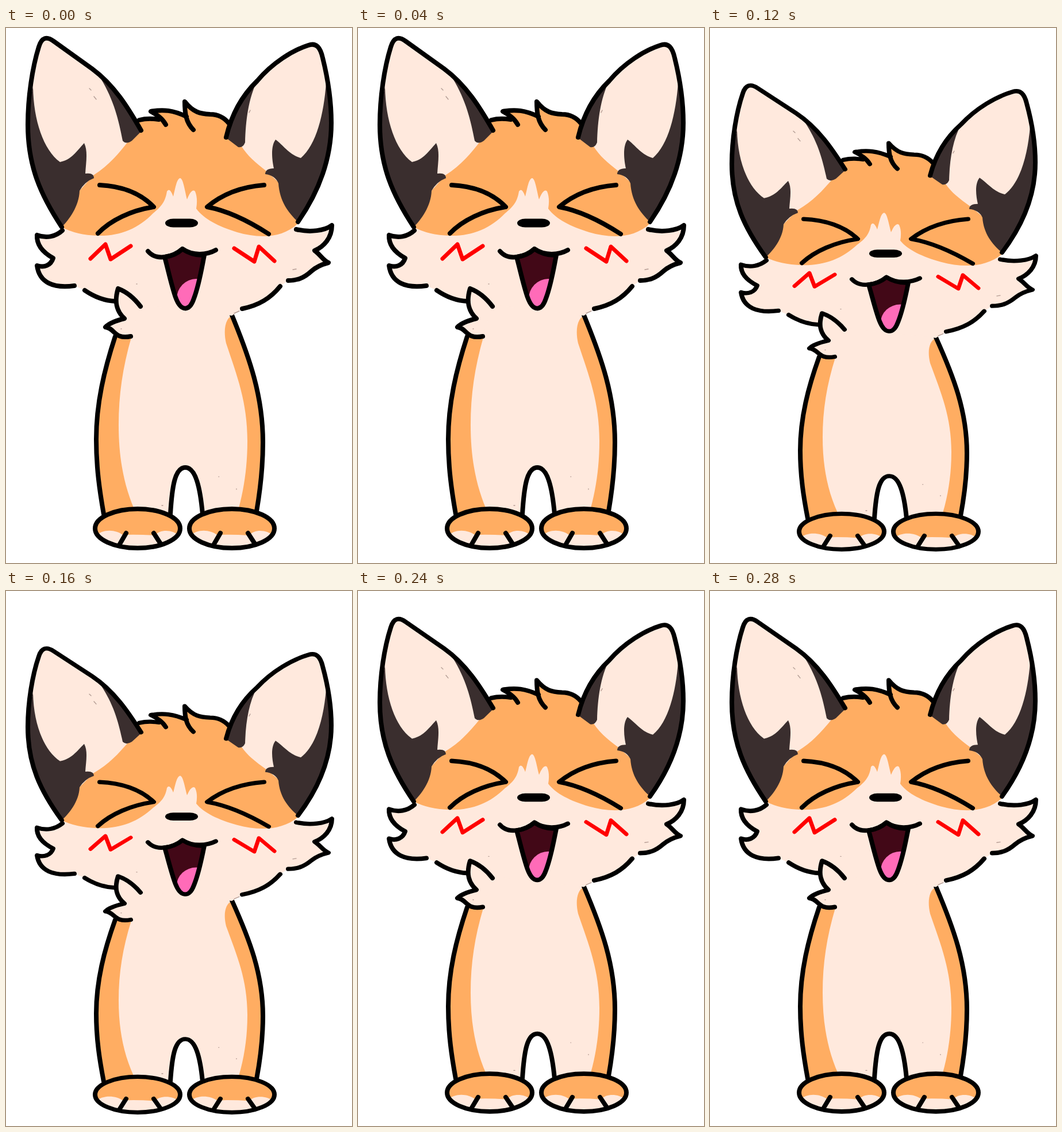
Recreate the animation shown at these times as an HTML page. Size 602 by 930 pixels, loop 0.3 s.

```html
<!DOCTYPE html>
<html lang="en">
<head>
<meta charset="utf-8">
<title>Bouncing fox</title>
<style>
  html, body { margin: 0; width: 100%; height: 100%; overflow: hidden; background: #fff; }
  svg { display: block; width: 100vw; height: 100vh; }
  .cream { fill: #ffe9dd; }
  .orange { fill: #ffad62; }
  .dark { fill: #3a2e2e; }
  .line { fill: none; stroke: #000; stroke-width: 8; stroke-linecap: round; stroke-linejoin: round; }
  .blush { fill: none; stroke: #f00; stroke-width: 7; stroke-linecap: round; stroke-linejoin: round; }
  .speck { fill: none; stroke: #b49c94; stroke-width: 1.4; stroke-linecap: round; }
</style>
</head>
<body>
<svg viewBox="0 0 602 930">
  <defs>
    <path id="earL" d="M97 346 C60 290 38 240 38 168 C38 120 46 68 57 33 C62 16 71 14 83 23 L150 71 C188 99 212 138 235 178"/>
    <path id="earR" d="M383 190 C392 152 408 120 437 92 C463 61 498 39 526 30 C540 25 547 34 551 52 C561 92 566 125 566 165 C566 232 542 288 508 337"/>
    <path id="cheekL" d="M98 352 C86 363 70 366 54 360 C53 377 64 390 82 400 C78 413 66 417 54 413 C58 443 83 453 119 448"/>
    <path id="cheekR" d="M505 350 C530 356 555 352 567 343 C567 365 553 380 537 387 C545 392 552 404 561 408 C549 411 540 415 531 423 C518 435 506 439 491 439"/>
    <path id="mouth" d="M276 398 C282 420 288 448 295 468 C304 493 319 494 327 470 C336 446 340 420 345 395 Q324 396 307 384 Q294 396 276 398 Z"/>
    <clipPath id="mouthClip"><use href="#mouth"/></clipPath>
    <clipPath id="footClip"><ellipse cx="229" cy="870" rx="74" ry="34"/></clipPath>
    <g id="foot">
      <ellipse class="orange" cx="229" cy="870" rx="74" ry="34"/>
      <path class="cream" clip-path="url(#footClip)" d="M150 890 C163 869 190 871 203 881 Q230 880 259 882 C268 871 290 872 300 882 L300 910 H150 Z"/>
      <ellipse class="line" cx="229" cy="870" rx="74" ry="34"/>
      <path class="line" d="M209 878 L198 897 M257 878 L268 895"/>
    </g>
  </defs>
  <g id="fox">
    <!-- body -->
    <path class="cream" d="M190 536 L206 505 L195 453 L393 485 V499 C424 574 447 640 447 720 C447 765 442 805 436 845 H342 C338 800 330 764 312 764 C294 764 289 796 286 845 H170 C163 805 157 765 157 715 C157 652 171 594 190 536 Z"/>
    <path class="orange" d="M190 536 L218 538 C203 590 196 638 196 690 C196 750 206 800 227 845 H170 C163 805 157 765 157 715 C157 652 171 594 190 536 Z"/>
    <path class="orange" d="M393 500 C424 574 447 640 447 720 C447 765 442 805 436 845 H402 C414 805 420 762 420 718 C420 650 402 605 383 548 C378 526 381 506 393 500 Z"/>
    <path class="line" d="M190 536 C171 594 157 652 157 715 C157 765 163 805 170 845 M393 499 C424 574 447 640 447 720 C447 765 442 805 436 840 M286 845 C289 796 294 764 312 764 C330 764 338 800 342 845"/>
    <use href="#foot"/>
    <use href="#foot" x="164"/>

    <!-- head fills -->
    <use href="#earL" class="cream"/>
    <use href="#earR" class="cream"/>
    <use href="#cheekL" class="cream"/>
    <use href="#cheekR" class="cream"/>
    <path class="cream" d="M98 346 L300 230 L506 346 L537 387 L491 439 L477 449 C460 470 440 482 411 488 L393 500 L190 476 C170 474 153 467 137 456 L119 448 L82 400 Z"/>
    <path class="orange" d="M97 346 L126 285 L152 256 C180 238 196 218 212 198 L236 178 L230 160 Q245 156 266 160 L252 145 C274 141 291 143 314 154 Q313 140 311 128 C326 147 338 149 355 150 C370 150 380 156 388 166 L383 190 L410 206 C420 222 434 234 452 248 L474 268 L508 340 C480 366 440 366 402 355 C370 345 344 332 331 314 Q334 296 329 284 Q323 278 315 298 C310 277 308 262 303 261 C297 262 295 277 291 293 Q285 276 280 284 C277 304 268 312 256 322 C230 349 198 362 160 361 Q122 360 97 346 Z"/>

    <!-- ear markings -->
    <path class="dark" d="M47 103 C48 160 65 212 94 233 C114 229 123 214 136 200 C143 214 139 235 138 253 Q153 251 153 261 Q137 267 128 283 C127 310 110 333 97 346 C60 290 38 240 38 168 Q38 138 47 103 Z"/>
    <path class="dark" d="M165 88 C188 126 196 160 203 196 Q209 203 219 196 L236 179 C214 140 192 110 165 84 Z"/>
    <path class="dark" d="M557 95 C553 150 540 203 513 226 C492 220 483 204 469 194 C460 206 463 230 466 244 Q451 244 451 254 Q468 256 474 270 C476 300 490 320 508 337 C542 288 566 232 566 165 Q566 128 557 95 Z"/>
    <path class="dark" d="M437 92 C422 122 417 160 416 199 Q412 209 404 207 L383 191 C392 152 408 120 437 92 Z"/>

    <!-- head lines -->
    <use href="#earL" class="line"/>
    <use href="#earR" class="line"/>
    <use href="#cheekL" class="line"/>
    <use href="#cheekR" class="line"/>
    <path class="line" d="M137 456 C153 467 170 474 190 475 M477 449 C460 470 440 482 411 488"/>
    <path class="line" d="M232 160 Q247 156 266 159 M278 168 C272 157 263 151 252 145 C274 141 291 143 314 154 M326 177 C313 164 311 148 311 128 C326 147 338 149 355 150 C370 150 380 156 388 166"/>
    <path class="cream" d="M234 484 C222 468 208 458 195 453 C188 476 192 492 206 505 C194 508 180 512 173 520 C190 522 188 542 217 536 Z"/>
    <path class="line" d="M234 484 C222 468 208 458 195 453 C188 476 192 492 206 505 C194 508 180 512 173 520 C190 522 188 542 217 536"/>

    <!-- face -->
    <path class="line" d="M163 273 C204 275 236 289 257 311 C218 317 182 334 160 357 M449 273 C410 276 376 289 350 311 C388 318 426 338 457 358"/>
    <rect x="277" y="331.5" width="57" height="15" rx="14" ry="7.5"/>
    <use href="#mouth" fill="#420817"/>
    <ellipse cx="331" cy="471" rx="34" ry="35" fill="#ff6bb8" clip-path="url(#mouthClip)"/>
    <use href="#mouth" class="line"/>
    <path class="line" d="M247 388 C262 406 291 398 307 384 C324 396 349 395 365 386"/>
    <path class="blush" d="M147 401 L173 376 L182 402 L217 379 M397 383 L432 406 L440 380 L467 405"/>
    <path class="speck" d="M145 105 l3 3 M153 119 l4 5 M423 147 l2 -4 M499 420 l6 -1 M200 523 h1 M227 445 h1 M271 830 h2 M401 801 v1 M370 780 h.5 M397 496 l9 -4"/>
  </g>
</svg>
<script>
  const fox = document.getElementById("fox");
  const hold = 60;
  const floor = 930;
  // share of the height lost at each step of the bounce
  const squash = [0, 0.0328, 0.09, 0.0537, 0.0339];

  function draw(ms) {
    const step = Math.floor(ms / hold) % squash.length;
    const k = 1 - squash[step];
    fox.setAttribute("transform", `translate(0 ${floor * (1 - k)}) scale(1 ${k})`);
  }

  let start;
  function tick(now) {
    start ??= now;
    draw(now - start);
    requestAnimationFrame(tick);
  }
  draw(0);
  requestAnimationFrame(tick);
</script>
</body>
</html>
```
